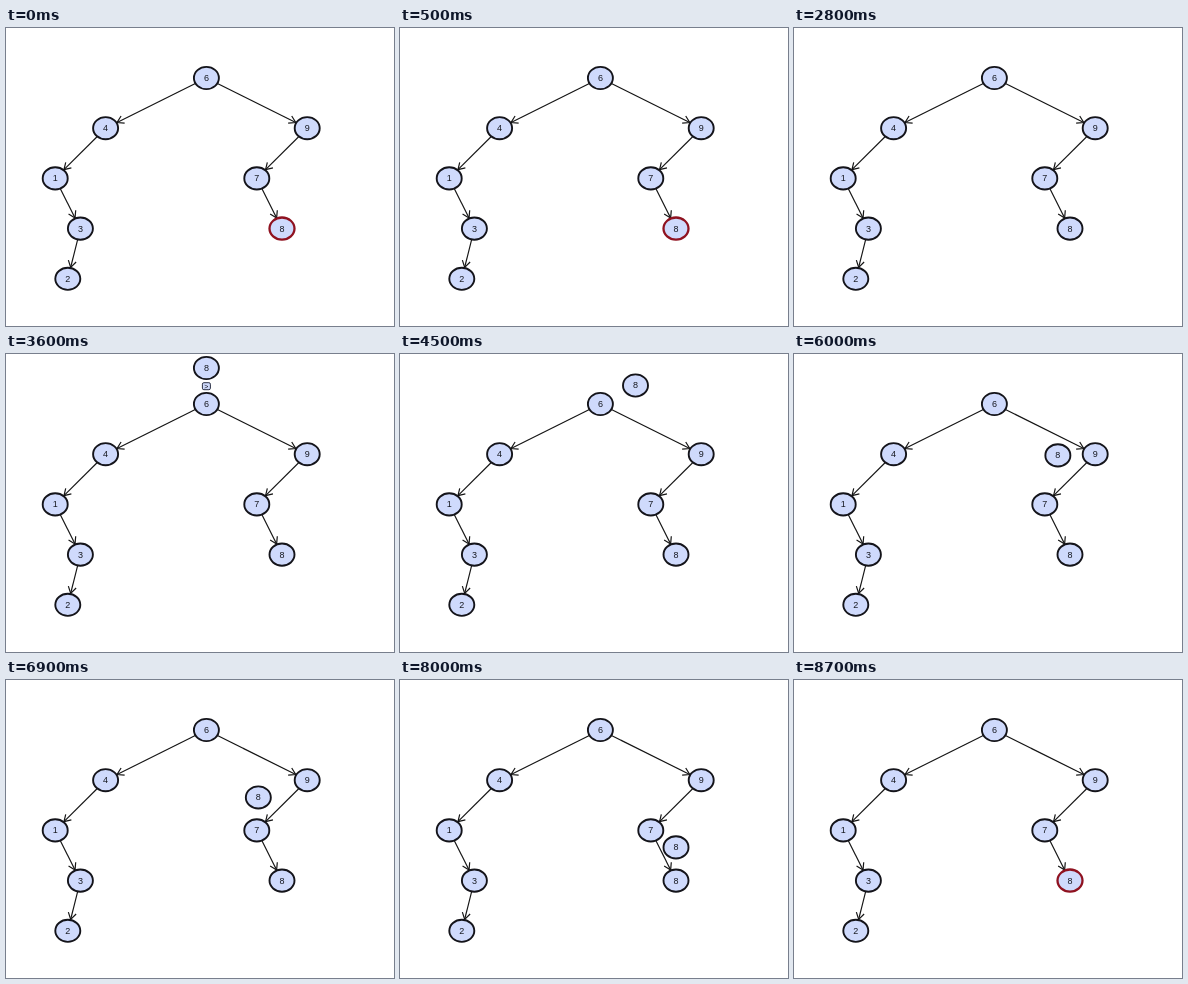
Write an HTML page that moves like this. It is 388x298 px and loops after 9.9 s.

```html
<!DOCTYPE html>
<html lang="en">
<head>
<meta charset="utf-8">
<title>Binary search tree lookup</title>
<style>
  html, body { margin: 0; width: 100%; height: 100%; overflow: hidden; background: #fff; }
  svg { display: block; width: 388px; height: 298px; }
  line, path { fill: none; stroke: #151515; stroke-width: 1.2; }
  ellipse { fill: #cfdafc; stroke: #14141a; stroke-width: 1.9; }
  rect { fill: #cfdafc; stroke: #2b3044; stroke-width: 1; }
  text { font: 9px "Liberation Sans", Arial, sans-serif; fill: #16181f; text-anchor: middle; }
  #sign text { font-size: 7px; }
  .found ellipse { stroke: #8f1220; stroke-width: 2.3; }
</style>
</head>
<body>
<svg viewBox="0 0 388 298">
  <g id="edges"></g>
  <g id="nodes"></g>
  <g id="sign">
    <rect x="-4" y="-3.5" width="8" height="7" rx="1.5"/>
    <text y="2.4"></text>
  </g>
</svg>
<script>
const LOOP = 9900, TICK = 100, RX = 12.5, RY = 11.1;
const $ = id => document.getElementById(id);

// Node positions; children hang one level (50.2px) below their parents.
const at = (column, level) => ({ x: 49.2 + 25.2 * column, y: 50 + 50.2 * level });
const tree = {
  6: at(6, 0), 4: at(2, 1), 9: at(10, 1), 1: at(0, 2),
  7: at(8, 2), 3: at(1, 3), 8: at(9, 3), 2: at(0.5, 4)
};
const links = [[6, 4], [6, 9], [4, 1], [9, 7], [1, 3], [7, 8], [3, 2]];

function add(parent, tag, attrs, text = "") {
  const el = document.createElementNS("http://www.w3.org/2000/svg", tag);
  for (const name in attrs) el.setAttribute(name, attrs[name]);
  el.textContent = text;
  return parent.appendChild(el);
}

function place(el, { x, y }) {
  el.setAttribute("transform", `translate(${x.toFixed(2)} ${y.toFixed(2)})`);
}

function addNode(label, pos) {
  const g = add($("nodes"), "g", {});
  add(g, "ellipse", { rx: RX, ry: RY });
  add(g, "text", { y: 3 }, label);
  place(g, pos);
  return g;
}

function addArrow(a, b) {
  const dx = b.x - a.x, dy = b.y - a.y;
  const k = 1 / Math.hypot(dx / (RX + 0.6), dy / (RY + 0.6));
  const x = b.x - dx * k, y = b.y - dy * k;
  add($("edges"), "line", { x1: a.x, y1: a.y, x2: x, y2: y });
  const angle = Math.atan2(dy, dx) * 180 / Math.PI;
  add($("edges"), "path", {
    d: "M-6.5-4L0 0L-6.5 4", transform: `translate(${x} ${y}) rotate(${angle})`
  });
}

links.forEach(([a, b]) => addArrow(tree[a], tree[b]));
const nodes = {};
for (const key in tree) nodes[key] = addNode(key, tree[key]);

const above = (key, gap) => ({ x: tree[key].x, y: tree[key].y - gap });
const seeker = addNode("8", above(6, 36));
const APPEAR = 2900, MERGE = 8400;

const moves = [
  { start: 4200, time: 755, from: above(6, 36), to: above(9, 36) },
  { start: 5600, time: 600, from: above(9, 36), to: above(7, 36) },
  { start: 6825, time: 500, from: above(7, 36), to: above(8, 36) },
  { start: 7925, time: 440, from: above(8, 36), to: tree[8] }
];
const signs = [
  { start: 3600, end: 4300, text: ">", key: 6 },
  { start: 5100, end: 5700, text: "<", key: 9 },
  { start: 6300, end: 6900, text: ">", key: 7 },
  { start: 7400, end: 8000, text: "=", key: 8 }
];

const smooth = p => p * p * (3 - 2 * p);
const show = (el, on) => el.style.display = on ? "" : "none";

function seekerAt(t) {
  const { start, time, from, to } = moves.findLast(m => t >= m.start) || moves[0];
  const p = smooth(Math.min(1, Math.max(0, (t - start) / time)));
  return { x: from.x + (to.x - from.x) * p, y: from.y + (to.y - from.y) * p };
}

function draw(now) {
  const t = Math.floor(now % LOOP / TICK) * TICK;
  nodes[8].classList.toggle("found", t < 2800 || t >= MERGE);
  show(seeker, t >= APPEAR && t < MERGE);
  place(seeker, seekerAt(t));

  const sign = signs.find(s => t >= s.start && t < s.end);
  show($("sign"), sign);
  if (sign) {
    $("sign").lastElementChild.textContent = sign.text;
    place($("sign"), above(sign.key, 17.8));
  }
}

const begin = performance.now();
function loop() {
  draw(performance.now() - begin);
  requestAnimationFrame(loop);
}
loop();
</script>
</body>
</html>
```
